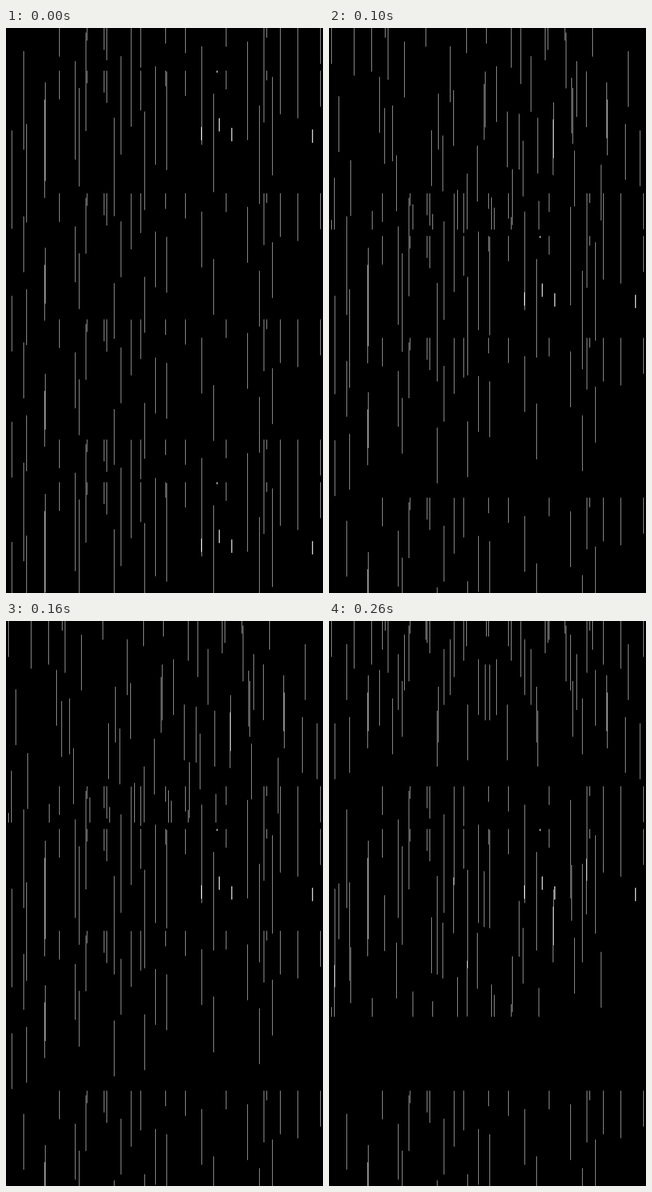
An HTML page with a canvas that plays this animation: 561 px wide and 998 px high, repeating every 300 ms.

```html
<!DOCTYPE html>
<html lang="en">
<head>
<meta charset="utf-8">
<title>Falling lines</title>
<style>
html, body { margin: 0; width: 100%; height: 100%; overflow: hidden; background: #000; }
canvas { display: block; }
</style>
</head>
<body>
<canvas id="stage" width="561" height="998"></canvas>
<script>
const ctx = document.getElementById('stage').getContext('2d');
const W = 561, H = 998, ECHO = 75.4, STEP = 100;

// columns of the streaks, ordered by how far each has fallen
const columns = [
  461, 143, 282, 389, 173, 317, 94, 178, 556, 238, 485, 516, 456, 221, 141, -16, 427,
  346, 31, 203, 122, 264, 284, 471, 69, 129, 367, 68, 448, 245, 191, 36, 10
];
// x and lower end of the bright dashes
const dashes = [[345.3, 198.5], [372.8, 78.8], [376.7, 182.8], [398.8, 200], [541.7, 202.8]];

const fallen = i => 17 + 5 * i + 0.1 * i * i;

// a vertical line ending at `end`, cut off above `top`
function line(x, end, length, width, top) {
  const start = Math.max(top, end - length);
  ctx.fillRect(x, start, width, end - start);
}

function band(top, mapX = x => x) {
  ctx.fillStyle = '#b8b8b8';
  columns.forEach((x, i) => line(mapX(x), top + fallen(i), 98.5, 1, top));
}

const mirrored = top => band(top, x => W - 1 - x);

function rotated(bottom) {
  ctx.save();
  ctx.translate(0, bottom);
  ctx.scale(1, -1);
  band(0, x => 465 - x);
  ctx.restore();
}

function doubled(top) {
  band(top);
  band(top + ECHO);
  ctx.fillStyle = '#fff';
  for (const [x, end] of dashes) line(x, top + end, 23.5, 1.5, top + ECHO);
}

const poses = [
  () => { doubled(0); band(292); band(514.7); doubled(727); },
  () => { mirrored(0); rotated(356); doubled(292); band(547.3); band(829.6); },
  () => { mirrored(0); band(0); doubled(292); rotated(699); band(829.6); }
];

function draw() {
  const pose = Math.floor(performance.now() / STEP) % poses.length;
  ctx.fillStyle = '#000';
  ctx.fillRect(0, 0, W, H);
  poses[pose]();
  requestAnimationFrame(draw);
}
draw();
</script>
</body>
</html>
```
